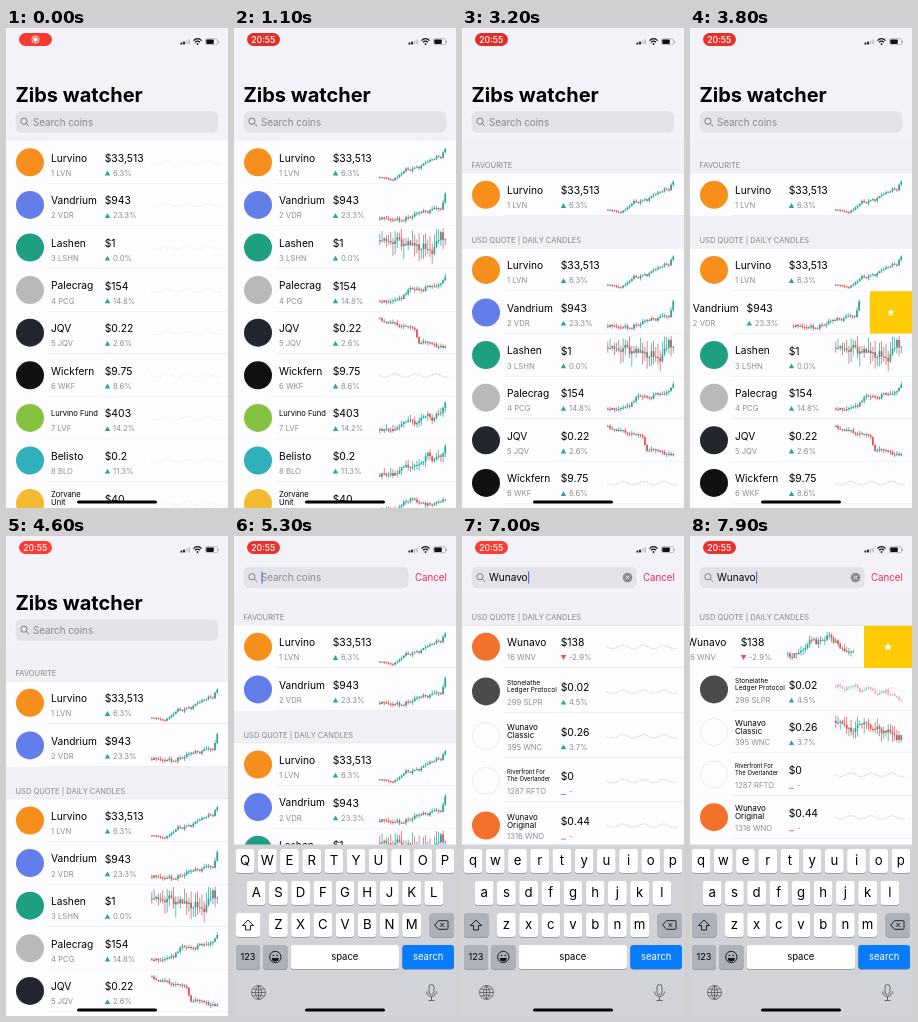
An HTML page with a canvas that plays this animation: 222x480 px, repeating every 8 s.

```html
<!DOCTYPE html>
<html lang="en">
<head>
<meta charset="utf-8">
<title>Coin list</title>
<style>
html, body { margin: 0; width: 100%; height: 100%; overflow: hidden; background: #f3f2f8; }
canvas { display: block; width: 222px; height: 480px; }
</style>
</head>
<body>
<canvas id="stage"></canvas>
<script>
const W = 222, H = 480, LOOP = 8000, ROW = 42.6, HEAD = 32.5;
const UP = '#26a69a', DOWN = '#e8504b', GREY = '#8e8e93', PAPER = '#fdfcff';
const canvas = document.getElementById('stage');
const c = canvas.getContext('2d');
const dpr = window.devicePixelRatio || 1;
canvas.width = W * dpr;
canvas.height = H * dpr;

const coin = (name, sub, price, pct, color, curve, opt = {}) =>
  ({ name: name.split('|'), sub, price, pct, color, curve, size: 10.2, vol: 3, wick: 3, load: 0, ...opt });

const coins = {
  lur: coin('Lurvino', '1 LVN', '$33,513', 6.3, '#f78f1c', [36, 37, 38, 38, 36, 33, 27, 29, 26, 27, 22, 20, 19, 16, 16, 8], { load: 300, vol: 2, wick: 2 }),
  van: coin('Vandrium', '2 VDR', '$943', 23.3, '#627eea', [35, 35, 36, 37, 36, 38, 35, 34, 30, 28, 28, 28, 25, 25, 26, 10], { load: 370 }),
  las: coin('Lashen', '3 LSHN', '$1', 0, '#1f9f82', [14, 13, 17, 16, 14, 18, 16, 18, 20, 22, 20, 25, 27, 14, 9, 13], { load: 440, vol: 6, wick: 13 }),
  pal: coin('Palecrag', '4 PCG', '$154', 14.8, '#b9b8ba', [32, 33, 34, 32, 31, 30, 24, 20, 20, 20, 21, 17, 17, 18, 15, 8], { load: 510 }),
  jqv: coin('JQV', '5 JQV', '$0.22', 2.6, '#22262e', [7, 10, 12, 10, 13, 15, 15, 16, 18, 31, 31, 30, 32, 36, 35, 35], { load: 580 }),
  wic: coin('Wickfern', '6 WKF', '$9.75', 8.6, '#111', null),
  luf: coin('Lurvino Fund', '7 LVF', '$403', 14.2, '#83c33f', [33, 34, 33, 33, 31, 27, 25, 22, 27, 24, 20, 18, 24, 16, 17, 6], { size: 7.6, load: 650, wick: 5 }),
  bel: coin('Belisto', '8 BLO', '$0.2', 11.3, '#2fb0bb', [36, 36, 34, 35, 33, 29, 26, 28, 25, 26, 22, 14, 20, 17, 18, 7], { load: 720, vol: 4, wick: 6 }),
  zor: coin('Zorvane|Unit', '9 ZVU', '$40', 3.9, '#f3ba2f', [30, 27, 28, 20, 18, 22, 23, 20, 18], { size: 7.6, load: 790 }),
  nim: coin('Nimbrow', '14 NBW', '$0.13', 4.1, '#3d9fdc', null),
  wun: coin('Wunavo', '16 WNV', '$138', -2.9, '#f4712b', [29, 31, 27, 23, 14, 18, 14, 8, 17, 21, 28, 26], { load: 7200, vol: 6, wick: 5 }),
  kuv: coin('KUV', '19 KUV', '$0.21', 1.6, '#4ba7cd', null),
  vor: coin('Vorbel', '24 VRBL', '$5.63', 4.3, '#3a3d55', null),
  jor: coin('Jorvex Lot', '26 JVL', '$0.06', -5, '#27406e', null, { size: 8.5 }),
  sto: coin('Stonelathe|Ledger Protocol', '299 SLPR', '$0.02', 4.5, '#4b4b4d', [18, 21, 16, 22, 20, 25, 22, 28, 32], { size: 6.6, load: 7780, vol: 5 }),
  wuc: coin('Wunavo|Classic', '395 WNC', '$0.26', 3.7, null, [10, 14, 20, 13, 14, 18, 20, 24, 29], { size: 8, load: 7400, vol: 7, wick: 9 }),
  riv: coin('Riverfront For|The Overlander', '1287 RFTO', '$0', null, null, null, { size: 5.9 }),
  wuo: coin('Wunavo|Original', '1316 WNO', '$0.44', null, '#f4712b', null, { size: 8 })
};
const pick = keys => keys.split(' ').map(k => coins[k]);
const all = pick('lur van las pal jqv wic luf bel zor');
const results = [
  { at: 5600, rows: pick('van nim wun kuv vor jor') },
  { at: 6000, rows: pick('wun nim vor wuc jor wuo') },
  { at: 6480, rows: pick('wun sto wuc riv wuo') }
];
const query = 'Wunavo';
const presses = [5500, 5780, 6070, 6320, 6540, 6740];
const keyRows = ['qwertyuiop', 'asdfghjkl', 'zxcvbnm'];

let t = 0;
const ease = (from, to) => {
  const p = Math.min(1, Math.max(0, (t - from) / (to - from)));
  return p * p * (3 - 2 * p);
};
const mix = (a, b, p) => a + (b - a) * p;
const rand = s => { const v = Math.sin(s * 127.1) * 43758.5453; return v - Math.floor(v); };

function faded(alpha, draw) {
  if (alpha <= 0) return;
  c.save();
  c.globalAlpha *= alpha;
  draw();
  c.restore();
}
function rect(x, y, w, h, color, r = 0) {
  c.fillStyle = color;
  c.beginPath();
  c.roundRect(x, y, w, h, r);
  c.fill();
}
function circle(x, y, r, color) {
  c.fillStyle = color;
  c.beginPath();
  c.arc(x, y, r, 0, 7);
  c.fill();
}
function stroke(path, color, width = 1) {
  c.strokeStyle = color;
  c.lineWidth = width;
  c.stroke(new Path2D(path));
}
function text(s, x, y, size, color = '#000', weight = 400, align = 'left') {
  c.font = `${weight} ${size}px Inter, sans-serif`;
  c.textAlign = align;
  c.fillStyle = color;
  c.fillText(s, x, y + size * 0.36);
}
function poly(points, color) {
  c.fillStyle = color;
  c.beginPath();
  points.forEach(p => c.lineTo(...p));
  c.fill();
}

function candles(k, top) {
  const n = 31, last = k.curve.length - 1, seed = k.price.length * 50 + k.curve[0];
  let open = k.curve[0];
  for (let i = 0; i < n; i++) {
    const f = i / (n - 1) * last, j = Math.min(last - 1, Math.floor(f));
    const noise = i < n - 1 ? (rand(seed + i * 3) - 0.5) * k.vol : 0;
    const close = mix(k.curve[j], k.curve[j + 1], f - j) + noise;
    const hi = Math.min(open, close), lo = Math.max(open, close);
    const color = close <= open ? UP : DOWN, x = 145 + i * 2.18;
    const high = Math.max(2, hi - rand(seed + i * 3 + 1) * k.wick);
    const low = Math.min(40, lo + rand(seed + i * 3 + 2) * k.wick);
    rect(x + 0.5, top + high, 0.7, low - high, color);
    rect(x, top + hi, 1.7, Math.max(1, lo - hi), color);
    open = close;
  }
}
function chart(k, top) {
  const shown = k.curve ? ease(k.load, k.load + 300) : 0;
  faded((1 - shown) * mix(0.3, 0.9, ease(0, 500)), () => {
    for (let i = 0; i < 32; i++) circle(145.8 + i * 2.2, top + 21.5 + 1.7 * Math.sin(i * 0.68), 0.7, '#c9c9cc');
  });
  faded(shown, () => candles(k, top));
}
function star(x, y, r) {
  poly(Array.from({ length: 10 }, (_, i) => {
    const a = i * Math.PI / 5 - Math.PI / 2, d = i % 2 ? r * 0.45 : r;
    return [x + d * Math.cos(a), y + d * Math.sin(a)];
  }), '#fff');
}

function row(k, top, swipe = 0) {
  rect(0, top, W, ROW, PAPER);
  c.save();
  c.translate(-swipe, 0);
  if (k.color) circle(24, top + 21.3, 14, k.color);
  else {
    c.strokeStyle = '#e4e4e7';
    c.lineWidth = 0.8;
    c.beginPath();
    c.arc(24, top + 21.3, 13.5, 0, 7);
    c.stroke();
  }
  const two = k.name.length > 1;
  k.name.forEach((line, i) => text(line, 45, top + (two ? 12.7 + i * Math.max(6.8, k.size) : 17), k.size));
  text(k.sub, 45, top + 32, 7.7, GREY);
  text(k.price, 98.7, top + 17, 10.4);
  const y = top + 32;
  if (k.pct === null) {
    rect(99, y + 2.5, 5, 0.8, DOWN);
    text('-', 107, y, 7.7, GREY);
  } else {
    const s = k.pct < 0 ? -1 : 1;
    poly([[98.8, y + 2.4 * s], [104.2, y + 2.4 * s], [101.5, y - 2.4 * s]], s < 0 ? DOWN : UP);
    text(k.pct.toFixed(1) + '%', 107, y, 7.7, GREY);
  }
  chart(k, top);
  c.restore();
  rect(42, top + ROW - 0.5, W - 42, 0.5, '#dcdce0');
  if (swipe > 0) {
    rect(W - swipe, top, swipe, ROW, '#fecb05');
    star(W - swipe / 2, top + 21.5, swipe * 0.09);
  }
}
function header(label, top, h = HEAD) {
  rect(0, top, W, h, '#f1f0f6');
  rect(0, top + h - 0.5, W, 0.5, '#dcdce0');
  text(label, 9.5, top + h - 8, 7.5, '#85858a');
}

function mainList(top) {
  const first = ease(2500, 2900), second = ease(4120, 4500);
  const swipes = [
    44 * (ease(1400, 1900) - ease(2380, 2650)),
    44 * (ease(3450, 3850) - ease(4020, 4300))
  ];
  let y = top;
  faded(first, () => {
    header('FAVOURITE', y, HEAD * first);
    row(all[0], y + HEAD * first);
  });
  y += (HEAD + ROW) * first;
  faded(second, () => row(all[1], y));
  y += ROW * second;
  faded(first, () => header('USD QUOTE | DAILY CANDLES', y, HEAD * first));
  y += HEAD * first;
  all.forEach((k, i) => row(k, y + i * ROW, swipes[i]));
}
function resultList(rows, top, last) {
  const pitch = ROW + (last ? 2.2 * (1 - ease(6950, 7300)) : 0);
  rect(0, top, W, H, PAPER);
  rows.forEach((k, i) => row(k, top + HEAD + i * pitch, last && i === 0 ? 48 * ease(7430, 7900) : 0));
}
function lists(top) {
  rect(0, top, W, H, PAPER);
  if (t < 5900) mainList(top);
  results.forEach((r, i) => {
    const p = ease(r.at, r.at + 300), next = results[i + 1];
    if (next && t > next.at + 300) return;
    faded(p, () => resultList(r.rows, top + (1 - p) * 12, !next));
  });
  faded(ease(5600, 5900), () => header('USD QUOTE | DAILY CANDLES', top));
}

function statusBar() {
  const glow = 0.5 + 0.5 * Math.cos((t - 2100) * Math.PI / 1250);
  rect(13, 5, 33, 13, `rgb(${mix(222, 252, glow)} ${mix(46, 59, glow)} ${mix(40, 50, glow)})`, 6.5);
  const time = ease(600, 800);
  faded(1 - time, () => {
    stroke('M33.2 11.5a3.7 3.7 0 1 1-7.4 0a3.7 3.7 0 1 1 7.4 0', '#fff', 0.8);
    circle(29.5, 11.5, 2.2, '#fff');
  });
  faded(time, () => text('20:55', 29.3, 11.5, 8.7, '#fff', 500, 'center'));
  for (let i = 0; i < 4; i++) rect(174.5 + i * 2.6, 14.5 - i, 1.8, 2 + i, i < 2 ? '#111' : '#c4c4c8', 0.5);
  stroke('M187.5 12.6a5.2 5.2 0 0 1 8 0M189 14.4a3.2 3.2 0 0 1 5 0', '#111', 1.2);
  circle(191.5, 16, 0.9, '#111');
  stroke('M201 10.7h9a1.5 1.5 0 0 1 1.5 1.5v3a1.5 1.5 0 0 1-1.5 1.5h-9a1.5 1.5 0 0 1-1.5-1.5v-3a1.5 1.5 0 0 1 1.5-1.5z', '#999', 0.6);
  rect(200.3, 11.5, 7.5, 4.4, '#111', 0.8);
  rect(212.2, 12.7, 0.8, 2, '#999');
}
function navBar(open, bottom) {
  rect(0, 0, W, bottom, '#f3f2f8');
  faded(1 - ease(4950, 5130), () => text('Zibs watcher', 9.5, mix(66.3, 30, open), 20, '#000', 700));
  const y = mix(94, 41.5, open), w = mix(202.5, 165, open);
  rect(9.7, y - 10.7, w, 21.4, '#e3e2e8', 6);
  stroke(`M21 ${y - 0.8}a3.1 3.1 0 1 1-6.2 0a3.1 3.1 0 1 1 6.2 0M20.2 ${y + 1.5}l2.8 2.8`, '#7f7f84', 1);
  const typed = query.slice(0, presses.filter(p => t >= p + 90).length);
  if (typed) {
    text(typed, 27, y, 10);
    circle(165.5, y, 4.8, '#8b8b90');
    stroke(`M163.7 ${y - 1.8}l3.6 3.6m0-3.6l-3.6 3.6`, '#fff', 0.9);
  } else text('Search coins', 27, y, 9.8, '#88888d');
  if (open > 0.5) {
    c.font = '400 10px Inter, sans-serif';
    rect(27.5 + c.measureText(typed).width, y - 6, 1.1, 12, '#3f6df0');
  }
  faded(open, () => text('Cancel', mix(222, 181, open), y, 9.7, '#e62a55'));
}

function key(x, y, w, color = '#fff') {
  rect(x, y + 0.7, w, 24, '#8b8d92', 3);
  rect(x, y, w, 24, color, 3);
}
function keyboard(top) {
  rect(0, top, W, H, '#d1d3d9');
  c.save();
  c.translate(0, top);
  const pressed = presses.findIndex(p => t >= p && t < p + 130);
  const upper = t < presses[0] + 130;
  let popup = null;
  keyRows.forEach((letters, r) => [...letters].forEach((ch, i) => {
    const x = 11.1 + i * 22.2 + [0, 11.1, 33.3][r], y = 4.5 + r * 32;
    const label = upper ? ch.toUpperCase() : ch;
    key(x - 9.4, y, 18.8);
    text(label, x, y + 11.6, 13.2, '#000', 400, 'center');
    if (pressed >= 0 && query[pressed].toLowerCase() === ch) popup = [label, x, y];
  }));
  const dark = '#adb1ba';
  key(2, 68.5, 24.5, upper ? '#fff' : dark);
  stroke('M14 75.5l-5.5 5.5h3v4.5h5v-4.5h3z', '#111', 0.9);
  key(195.5, 68.5, 24.5, dark);
  stroke('M204.5 76.2h8.5q1 0 1 1v6.6q0 1-1 1h-8.5l-3.8-4.3zM206.3 78.5l4 4m0-4l-4 4', '#111', 0.9);
  key(2, 100.5, 24, dark);
  text('123', 14, 112.5, 9.2, '#000', 400, 'center');
  key(29, 100.5, 24.5, dark);
  stroke('M47 112.5a5.7 5.7 0 1 1-11.4 0a5.7 5.7 0 1 1 11.4 0', '#111', 0.9);
  circle(39.4, 111, 0.8, '#111');
  circle(43.2, 111, 0.8, '#111');
  c.fillStyle = '#111';
  c.fill(new Path2D('M37.8 113.4h7a3.5 3.5 0 0 1-7 0z'));
  key(56.7, 100.5, 108.3);
  text('space', 110.8, 112, 9.5, '#000', 400, 'center');
  key(168.3, 100.5, 51.7, '#087cff');
  text('search', 194.2, 112, 9.5, '#fff', 400, 'center');
  stroke('M31.5 148a7 7 0 1 1-14 0a7 7 0 1 1 14 0M17.5 148h14M24.5 141v14M24.5 141q-6.5 7 0 14q6.5-7 0-14M18.7 144.3q5.8 2.5 11.6 0M18.7 151.7q5.8-2.5 11.6 0', '#55585e', 0.8);
  stroke('M197.5 140a2.5 2.5 0 0 1 2.5 2.5v5a2.5 2.5 0 0 1-5 0v-5a2.5 2.5 0 0 1 2.5-2.5M192.5 147a5 5 0 0 0 10 0M197.5 152v4M194.5 156h6', '#55585e', 0.9);
  if (popup) {
    const [label, px, y] = popup, x = Math.min(203, Math.max(19, px));
    c.save();
    c.shadowColor = 'rgba(0,0,0,.35)';
    c.shadowBlur = 3 * dpr;
    c.fillStyle = '#fff';
    const b = y - 38, l = px - 9.4, r = px + 9.4;
    c.fill(new Path2D(`M${x - 12} ${b}H${x + 12}q5 0 5 5V${b + 25}C${x + 17} ${b + 33} ${r} ${b + 32} ${r} ${b + 40}V${y + 21}q0 3-3 3H${l + 3}q-3 0-3-3V${b + 40}C${l} ${b + 32} ${x - 17} ${b + 33} ${x - 17} ${b + 25}V${b + 5}q0-5 5-5z`));
    c.restore();
    text(label, x, y - 21, 20, '#000', 400, 'center');
  }
  c.restore();
}

function frame() {
  t = performance.now() % LOOP;
  c.setTransform(dpr, 0, 0, dpr, 0, 0);
  const open = ease(4950, 5300), bottom = mix(113, 57, open);
  lists(bottom);
  navBar(open, bottom);
  statusBar();
  if (open > 0) keyboard(mix(H, 308.5, open));
  rect(71, 472.4, 80, 3, '#000', 1.5);
  requestAnimationFrame(frame);
}
frame();
</script>
</body>
</html>
```
